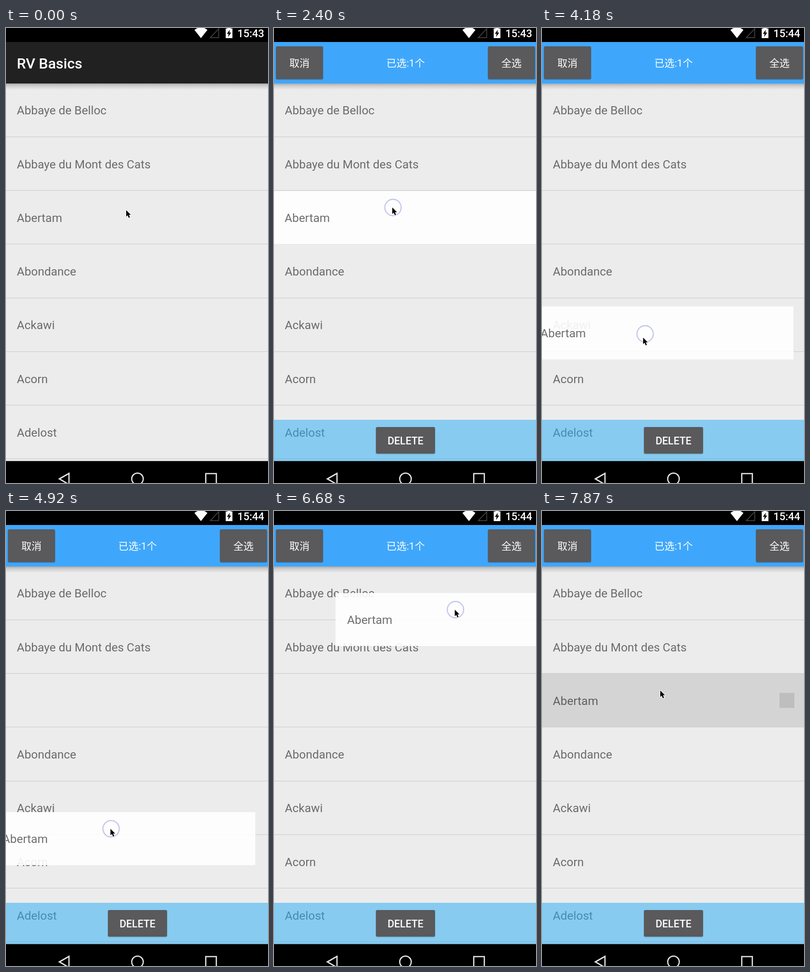
Write an HTML page with a canvas that moves like this. It is 545 by 943 pixels and loops after 8 s.

```html
<!DOCTYPE html>
<html lang="en">
<head>
<meta charset="utf-8">
<title>List drag and select</title>
<style>
html, body { margin: 0; width: 100%; height: 100%; overflow: hidden; background: #000; }
canvas { display: block; }
</style>
</head>
<body>
<canvas id="stage" width="545" height="943"></canvas>
<script>
const ctx = document.getElementById('stage').getContext('2d');
const W = 545, LOOP = 8000;
const STEP = 148.5; // the screen refreshes in coarse steps
const ROW_TOP = 114.5, ROW_H = 111.25, PICKED = 2;
const LATIN = 'Roboto, "Noto Sans CJK SC", "Noto Sans CJK", sans-serif';
const ROWS = ['Abbaye de Belloc', 'Abbaye du Mont des Cats', 'Abertam', 'Abondance', 'Ackawi', 'Acorn', 'Adelost'];
const TOUCH = 1500, LIFT = 2100, SELECT = 2250, ACTIVE = 2400, MINUTE = 3580, DROP = 6980;

// The dragged row and the touch ring follow the pointer with a delay.
const ROW_LAG = 40, RING_LAG = 10;
const GRIP = { x: 247, y: 34.5 };

// Key points of the pointer: time, x, y
const PATH = [
  [0, 250, 377.5],
  [150, 246, 372],
  [3840, 246, 372],
  [4118, 221, 611],
  [4178, 205, 657],
  [5060, 220, 659],
  [5454, 260, 412],
  [5494, 325, 406],
  [5560, 374, 395],
  [5940, 374, 350],
  [6090, 374, 225],
  [6180, 373, 235.5],
  [6480, 373, 235.5],
  [6640, 376, 204.5],
  [7570, 376, 204.5],
  [7870, 424, 96]
];

const clamp = v => Math.max(0, Math.min(1, v));

function pointerAt(t) {
  const i = Math.max(1, PATH.findIndex(key => key[0] >= t));
  const [t0, x0, y0] = PATH[i - 1], [t1, x1, y1] = PATH[i];
  const p = clamp((t - t0) / (t1 - t0));
  return { x: x0 + (x1 - x0) * p, y: y0 + (y1 - y0) * p };
}

function rect(x, y, w, h, fill) {
  ctx.fillStyle = fill;
  ctx.fillRect(x, y, w, h);
}

function paint(fill, stroke, width) {
  if (fill) {
    ctx.fillStyle = fill;
    ctx.fill();
  }
  if (stroke) {
    ctx.strokeStyle = stroke;
    ctx.lineWidth = width;
    ctx.stroke();
  }
}

function path(points, ...style) {
  ctx.beginPath();
  points.forEach(([x, y]) => ctx.lineTo(x, y));
  ctx.closePath();
  paint(...style);
}

function circle(x, y, r, ...style) {
  ctx.beginPath();
  ctx.arc(x, y, r, 0, Math.PI * 2);
  paint(...style);
}

function text(str, x, y, size, color, weight = 400, align = 'left') {
  ctx.font = `${weight} ${size}px ${LATIN}`;
  ctx.textAlign = align;
  ctx.fillStyle = color;
  ctx.fillText(str, x, y);
}

function button(x, y, w, h, label, size, weight) {
  ctx.save();
  ctx.shadowColor = 'rgba(0,0,0,.3)';
  ctx.shadowBlur = 2;
  ctx.shadowOffsetY = 1;
  ctx.beginPath();
  ctx.roundRect(x, y, w, h, 3);
  paint('#5a595b');
  ctx.restore();
  text(label, x + w / 2, y + h / 2 + size * 0.38, size, '#fff', weight, 'center');
}

function statusBar(t) {
  rect(0, 0, W, 29, '#000');
  ctx.beginPath();
  ctx.moveTo(405.5, 21);
  ctx.lineTo(392, 4);
  ctx.quadraticCurveTo(405.5, -7, 419, 4);
  ctx.closePath();
  paint('#fff');
  path([[442.5, 1.5], [442.5, 20], [425, 20]], null, '#4b4b4b', 1.5);
  rect(457, 1, 14, 20, '#fff');
  rect(460.5, 0, 7, 2, '#fff');
  path([[465.5, 3.5], [459.5, 12], [463, 12], [462, 18.5], [468.5, 9.5], [464.8, 9.5]], '#000');
  text(t < MINUTE ? '15:43' : '15:44', 537, 19, 22, '#fff', 500, 'right');
}

function navBar() {
  const color = '#e4e4e4', line = 2.6;
  rect(0, 897.5, W, 46, '#000');
  path([[111, 934.5], [131, 923], [131, 946]], null, color, line);
  circle(273.5, 934.5, 12, null, color, line);
  path([[415.5, 923.5], [437.5, 923.5], [437.5, 946], [415.5, 946]], null, color, line);
}

function list(t) {
  rect(0, 115, W, 783, '#ececec');
  const pressed = t < DROP ? 0 : clamp((t - DROP + STEP) / 740);
  const shade = `rgba(0,0,0,${0.1 * pressed})`;
  rect(0, ROW_TOP + PICKED * ROW_H, W, ROW_H, shade);
  rect(494, 377, 31, 31, shade);
  ROWS.forEach((name, i) => {
    const top = ROW_TOP + i * ROW_H;
    rect(0, Math.round(top + ROW_H) - 1, W, 1.3, '#cfcfcf');
    if (i !== PICKED || t < LIFT || t >= DROP)
      text(name, 22.6, Math.round(top + 64.8), 24.45, pressed && i === PICKED ? '#606060' : '#6b6b6b');
  });
}

function header(alpha) {
  const g = ctx.createLinearGradient(0, 115, 0, 128);
  g.addColorStop(0, 'rgba(0,0,0,.27)');
  g.addColorStop(0.4, 'rgba(0,0,0,.12)');
  g.addColorStop(1, 'rgba(0,0,0,0)');
  rect(0, 115, W, 13, g);
  rect(0, 29, W, 86, '#212121');
  text('RV Basics', 22.5, 84, 30.3, '#fff', 500);
  if (!alpha) return;

  ctx.globalAlpha = alpha;
  rect(0, 29, W, 86, '#3fa7fb');
  button(4, 38, 98, 68, '取消', 21, 400);
  button(445, 38, 98, 68, '全选', 21, 400);
  text('已选:1个', 273.7, 80, 21, '#fff', 400, 'center');
  rect(0, 812, W, 85.5, 'rgba(36,172,248,.5)');
  button(212, 827, 123, 55, 'DELETE', 21.3, 500);
  ctx.globalAlpha = 1;
}

function liftedRow({ x, y }) {
  const left = x - GRIP.x, top = Math.round(y - GRIP.y);
  rect(left - 1, top, 550, 110, 'rgba(255,255,255,.9)');
  text(ROWS[PICKED], left + 23, top + 64, 24.45, '#6f6f6f');
}

function arrow({ x, y }) {
  const shape = [[0, 0], [0, 13.5], [3.1, 10.7], [5.4, 16], [7.9, 15], [5.6, 9.8], [9.8, 9.8]]
    .map(([a, b]) => [x + a, y + b]);
  ctx.lineJoin = 'round';
  path(shape, null, '#fff', 2);
  path(shape, '#000');
  ctx.lineJoin = 'miter';
}

function draw(now) {
  const t = Math.floor((now + 11) / STEP) * STEP;
  list(now);
  header(now < SELECT ? 0 : now < ACTIVE ? 0.5 : 1);
  statusBar(now);
  navBar();
  if (now >= SELECT && now < DROP) liftedRow(pointerAt(t - ROW_LAG));
  if (now >= TOUCH && now < DROP) {
    const ring = pointerAt(t - RING_LAG);
    circle(ring.x + 1.5, ring.y, 17, 'rgba(255,255,255,.7)', '#c6c6ea', 2.4);
  }
  arrow(pointerAt(t));
}

function loop() {
  draw(performance.now() % LOOP);
  requestAnimationFrame(loop);
}
loop();
</script>
</body>
</html>
```
